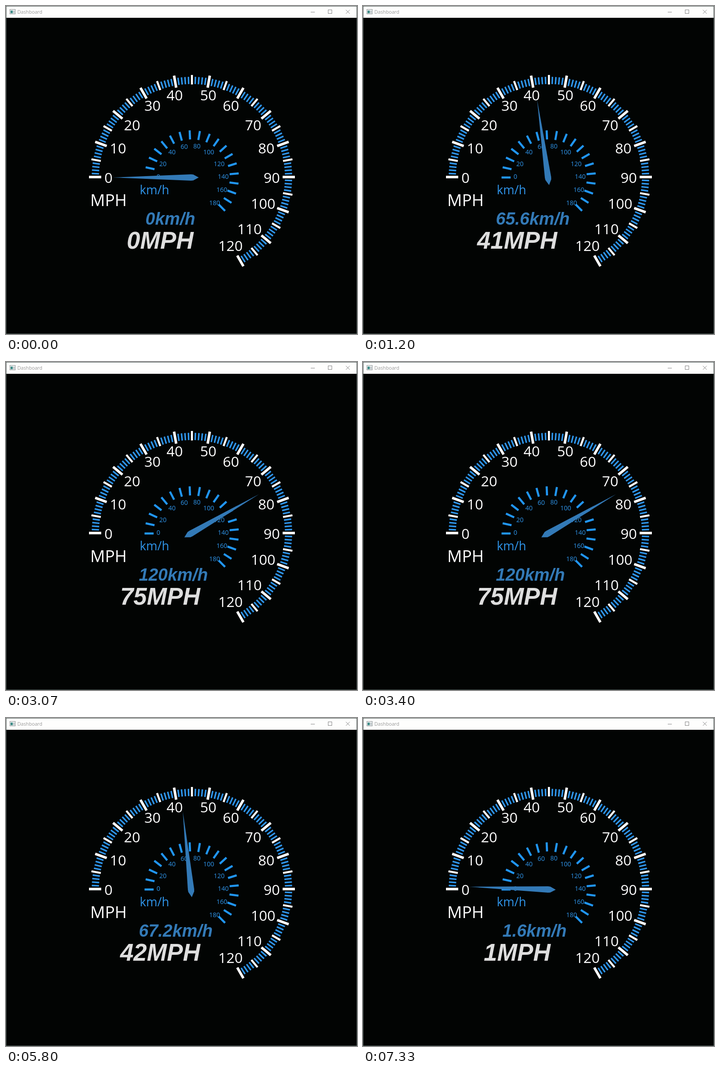
An HTML page that plays this animation: 774x723 px, repeating every 8 s.

```html
<!DOCTYPE html>
<html lang="en">
<head>
<meta charset="utf-8">
<title>Dashboard</title>
<style>
  html, body { margin: 0; width: 100%; height: 100%; overflow: hidden; background: #020403; }
  svg { display: block; width: 774px; height: 723px; }
  text { font-family: "Open Sans", "Noto Sans", sans-serif; }
  .mid { text-anchor: middle; }
  .white { fill: #fff; }
  .blue { fill: #2f95ea; }
  .digital { font: italic bold 53px "Liberation Sans", Arial, sans-serif; }
  #kmh { font-size: 38px; }
</style>
</head>
<body>
<svg viewBox="0 0 774 723">
  <rect width="774" height="723" fill="#4a5853"/>
  <rect x="1" y="1" width="772" height="721" fill="#020403"/>
  <rect x="1" y="1" width="772" height="25" fill="#fefefd"/>

  <rect x="8.5" y="7.5" width="12" height="10" fill="#f4f6f6" stroke="#8b9294"/>
  <rect x="10" y="10" width="5" height="6" fill="#3f8b87"/>
  <rect x="16" y="10" width="3" height="6" fill="#b9c3c6"/>
  <text x="25" y="17" font-size="10.7" fill="#999">Dashboard</text>
  <g fill="none" stroke="#858585">
    <path d="M672 13.5h9M749.5 8.5l8.5 8.5M758 8.5l-8.5 8.5"/>
    <rect x="710.5" y="8.5" width="8" height="8"/>
  </g>

  <g id="dial"></g>
  <text class="mid white" x="226" y="441" font-size="36">MPH</text>
  <text class="mid blue" x="327.5" y="415" font-size="26.6">km/h</text>

  <text id="kmh" class="digital" y="482" fill="#337ab7"></text>
  <text id="mph" class="digital mid" x="340" y="535" fill="#dedede"></text>
  <path id="needle" d="M235 378L408 371L413 371.5L425 378L413 384.5L408 385Z" fill="#337ab7"/>
</svg>
<script>
  const LOOP = 8000;
  const speeds = [[0, 0], [1200, 41], [3070, 75], [5070, 42], [7070, 1]];
  const byId = id => document.getElementById(id);
  const dial = byId('dial');

  function add(name, attrs, label) {
    const el = document.createElementNS('http://www.w3.org/2000/svg', name);
    for (const key in attrs) el.setAttribute(key, attrs[key]);
    if (label !== undefined) el.textContent = label;
    dial.append(el);
  }

  // A radial tick; 0 degrees points left, angles run clockwise.
  function tick(cx, cy, deg, inner, outer, width, color) {
    add('path', {
      d: `M${cx - outer} ${cy}H${cx - inner}`,
      transform: `rotate(${deg} ${cx} ${cy})`,
      stroke: color, 'stroke-width': width
    });
  }

  function labels(points, step, size, cls) {
    points.forEach(([x, y], i) => add('text', {
      x, y: y + size * 0.357, 'font-size': size, class: 'mid ' + cls
    }, i * step));
  }

  for (let v = 0; v <= 120; v++) {
    const [inner, outer, width, color] =
      v % 10 === 0 ? [200, 227, 5.6, '#fff'] :
      v % 5 === 0 ? [204, 225, 4.4, '#fff'] : [205, 221, 3.4, '#2f95ea'];
    tick(410, 377, v * 2, inner, outer, width, color);
  }
  for (let i = 0; i <= 18; i++) tick(409.5, 378, i * 12.5, 84, 104, 4.6, '#2196f3');

  labels([[226, 379], [247, 314], [278, 263], [323, 220], [372, 197], [446, 197], [496, 220],
          [545, 263], [574, 314], [586, 379], [567, 436], [537, 492], [495, 529]], 10, 31.5, 'white');
  labels([[336, 376], [346, 348], [366, 322], [393, 310], [421, 309],
          [447, 322], [470, 348], [479, 376], [476, 405], [460, 434]], 20, 14, 'blue');

  let shown = -1;
  function show(v) {
    if (v === shown) return;
    shown = v;
    byId('needle').setAttribute('transform', `rotate(${v * 2} 408 378)`);
    byId('mph').textContent = v + 'MPH';
    byId('kmh').textContent = +(v * 1.6).toFixed(1) + 'km/h';
    byId('kmh').setAttribute('x', v < 10 ? 307.5 : 293);
  }

  const start = performance.now();
  function frame(now) {
    const t = Math.max(0, now - start) % LOOP;
    show(speeds.filter(s => s[0] <= t).pop()[1]);
    requestAnimationFrame(frame);
  }
  show(0);
  requestAnimationFrame(frame);
</script>
</body>
</html>
```
